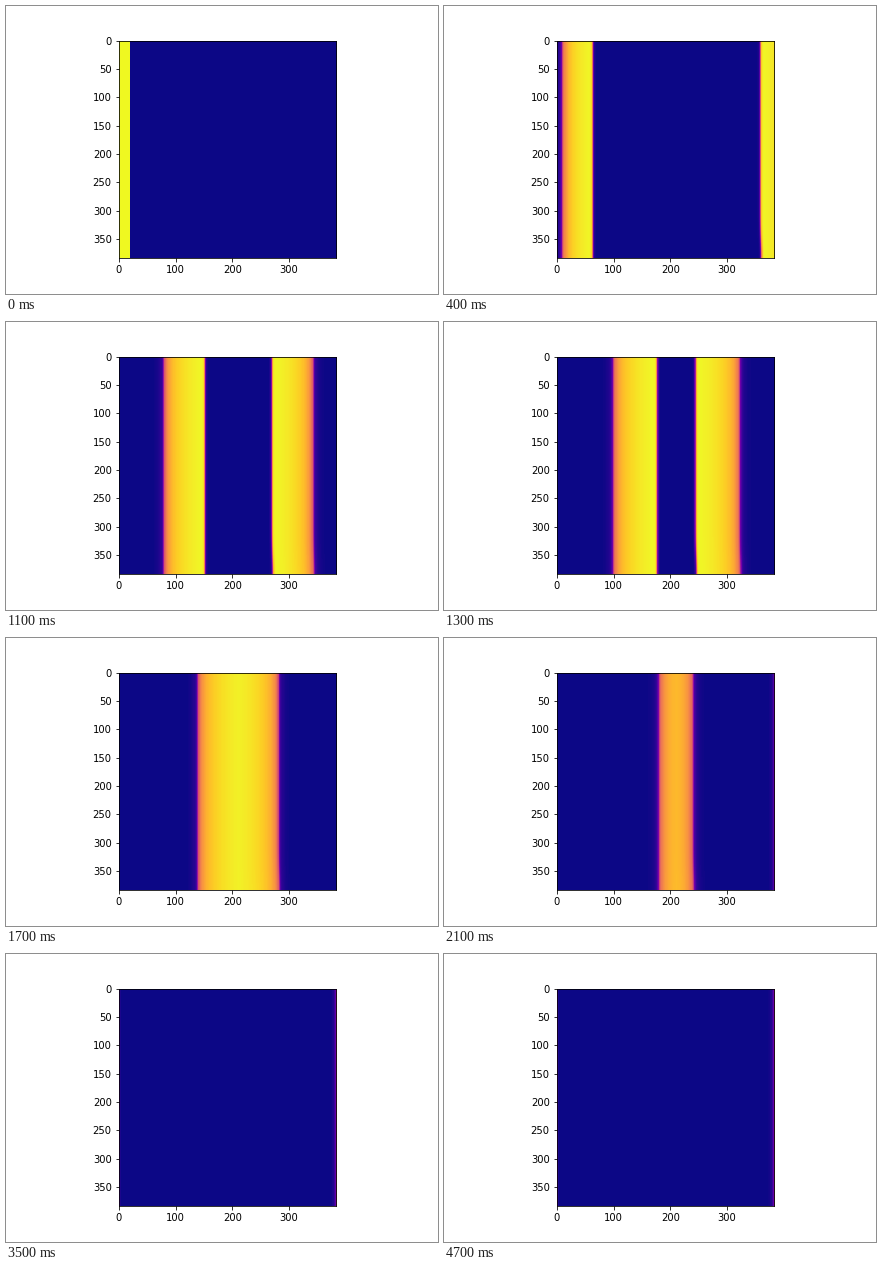
Write a matplotlib script that moves like this. It is 432 by 288 pixels and loops after 4800 ms.

```python
import numpy as np
import matplotlib.pyplot as plt
from matplotlib.animation import FuncAnimation

N = 384
FRAMES = 48
STIM = 20        # width of the initially excited strip

y, x = np.mgrid[0:N, 0:N].astype(float)


def sigmoid(z):
    return 1 / (1 + np.exp(-np.clip(z, -60, 60)))


# Activation time: one wave runs right from the strip, one enters at the right edge
lag = 0.13 * np.exp(-((N - 1 - y) / 40) ** 2)
from_left = np.where(x < STIM, 0, (x - 12.2) / 12.6)
from_right = 1.94 + (N - x) / 12.7 + lag
start = np.minimum(from_left, from_right)

# Recovery time: slower wave backs that merge smoothly near the middle
back_left = 8 + (x - 48) / 10
back_right = 8 + (373 - x) / 10.2 + lag
SOFT = 1.8
end = -SOFT * np.logaddexp(-back_left / SOFT, -back_right / SOFT)


def plateau(s):
    s = np.clip(s, 0, 1)
    load = np.expm1(1.5 * s) / np.expm1(1.5)
    return 0.575 + 0.425 * np.sqrt(1 - load)


def edge_glow(t):
    if t < 20:
        return 0
    flash = t % 3 == 2
    glow = (0.42 if flash else 0.3) * np.exp(-(N - 1 - x) / 2.5)
    if t >= 29:
        glow = glow + (0.15 if flash else 0.12) * np.exp(-x)
    return glow


def field(t):
    if t == 0:
        return (x < STIM).astype(float)
    front = np.where(x < STIM, 1, sigmoid((t - start) / 0.08))
    late = t - end
    drop = 0.65 * sigmoid(-late / 0.1) + 0.35 * sigmoid(-late / 0.45)
    body = plateau((t - start) / (end - start + 0.15))
    return np.maximum(front * body * drop, edge_glow(t))


fig, ax = plt.subplots(figsize=(6, 4), dpi=72, facecolor="white")
fig.subplots_adjust(left=0.125, right=0.9, bottom=0.125, top=0.88)
image = ax.imshow(field(0), cmap="plasma", vmin=0, vmax=1,
                  interpolation="nearest")
ax.set_xticks(range(0, N, 100))
ax.set_yticks(range(0, N, 50))
ax.tick_params(labelsize=10)


def update(t):
    image.set_data(field(t))
    return [image]


anim = FuncAnimation(fig, update, frames=FRAMES, interval=100,
                     repeat=True, repeat_delay=0, blit=False)
plt.show()
```
